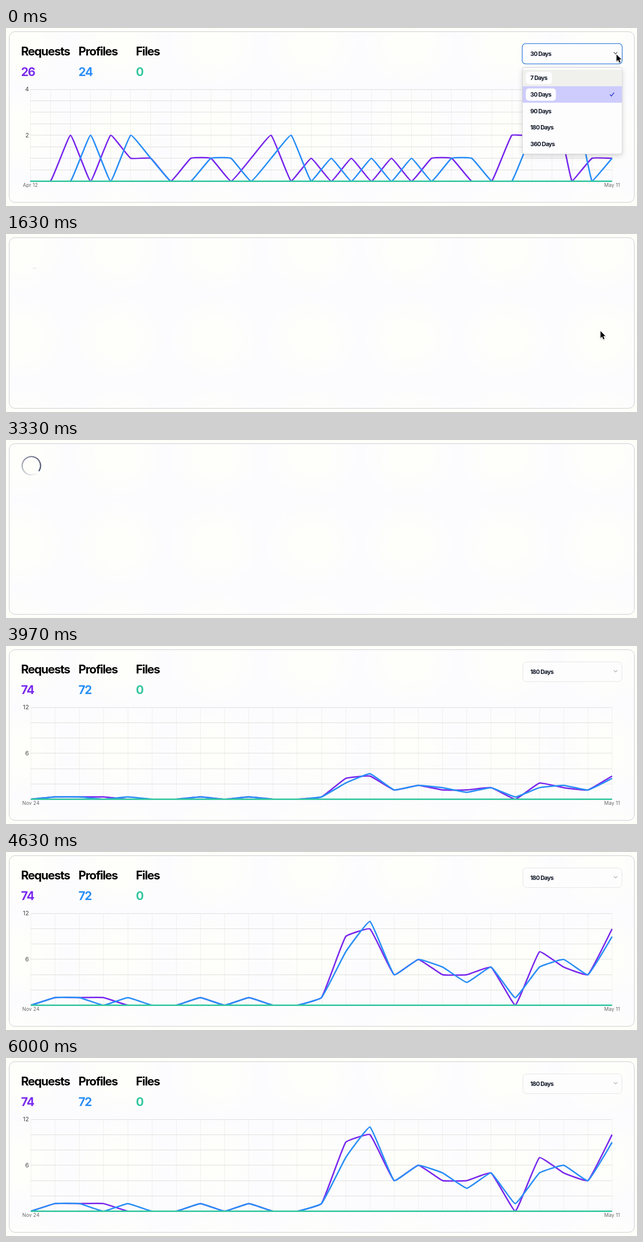
An HTML page with a canvas that plays this animation: 1280 px wide and 363 px high, repeating every 6.03 s.

```html
<!DOCTYPE html>
<html lang="en">
<head>
<meta charset="utf-8">
<style>
  html, body { margin: 0; width: 100%; height: 100%; overflow: hidden; background: #fefef9; }
  #panel {
    position: absolute; left: 6px; top: 7px; width: 1267px; height: 347px;
    border: 1px solid #c8c8d0; border-radius: 12px;
    background: radial-gradient(closest-side, #fefefa, #fefefb 35%, #fcfcfe) -77px -66px / 197px 181px #fcfcfe;
  }
  canvas { position: absolute; left: 0; top: 0; display: block; }
</style>
</head>
<body>
<div id="panel"></div>
<canvas id="stage" width="1280" height="363"></canvas>
<script>
const ctx = document.getElementById('stage').getContext('2d');
const LOOP = 6030, LOAD_AT = 1520, CHART_AT = 3885, CURSOR_GONE = 2850;
const PURPLE = '#7a2aec', BLUE = '#2b8ff6', TEAL = '#35c7a0';
const TOP = 125, BASE = 312.5, RIGHT = 1229.5;
const OPTIONS = ['7 Days', '30 Days', '90 Days', '180 Days', '360 Days'];

const month = {
  label: '30 Days', totals: [26, 24, 0], left: 49.5, max: 4, rows: 8, from: 'Apr 12',
  requests: [0,0,2,0,2,1,1,0,1,1,0,1,2,0,1,0,1,0,1,0,1,1,0,0,2,2,4,0,1,1],
  profiles: [0,0,0,2,0,2,1,0,0,1,1,0,1,2,0,1,0,1,0,1,0,1,1,0,0,2,2,4,0,1]
};
const halfYear = {
  label: '180 Days', totals: [74, 72, 0], left: 50.5, max: 12, rows: 6, from: 'Nov 24',
  requests: [0,1,1,1,0,0,0,1,0,1,0,0,1,9,10,4,6,4,4,5,0,7,5,4,10],
  profiles: [0,1,1,0,1,0,0,1,0,1,0,0,1,7,11,4,6,5,3,5,1,5,6,4,9]
};

// Cursor tip: time, x, y
const cursorPath = [[0,1238.5,54], [200,1238,56], [550,1223,138], [870,1213.5,175], [1150,1207,202], [1500,1206,198]];

function text(str, x, y, size, weight, color, spacing = 0, align = 'left') {
  ctx.font = `${weight} ${size}px Inter, sans-serif`;
  ctx.letterSpacing = spacing + 'px';
  ctx.textAlign = align;
  ctx.fillStyle = color;
  ctx.fillText(str, x, y);
}

const label = (str, x, y) => text(str, x, y, 12, 700, '#111827', -0.8);
const date = (str, x) => text(str, x, 324, 10, 400, '#666', 0.15, 'center');
const tickLabel = (value, y) => text(value, 46.5, y, 12, 400, '#444', 0, 'right');

function line(points, color, width) {
  ctx.beginPath();
  points.forEach(([x, y]) => ctx.lineTo(x, y));
  ctx.strokeStyle = color;
  ctx.lineWidth = width;
  ctx.stroke();
}

function box(x, y, w, h, r, fill, stroke, width = 1) {
  ctx.beginPath();
  ctx.roundRect(x, y, w, h, r);
  ctx.fillStyle = fill;
  ctx.fill();
  if (!stroke) return;
  ctx.shadowColor = 'transparent';
  ctx.strokeStyle = stroke;
  ctx.lineWidth = width;
  ctx.stroke();
}

// Cardinal spline whose handles are weighted by neighbour distance
function curve(pts, color) {
  const clampY = y => Math.min(BASE, Math.max(TOP, y));
  const handles = pts.map((p, i) => {
    const a = pts[i - 1] || p, b = pts[i + 1] || p;
    const before = Math.hypot(p[0] - a[0], p[1] - a[1]);
    const after = Math.hypot(b[0] - p[0], b[1] - p[1]);
    const k = 0.1 / (before + after), dx = b[0] - a[0], dy = b[1] - a[1];
    return [p[0] - k * before * dx, clampY(p[1] - k * before * dy),
            p[0] + k * after * dx, clampY(p[1] + k * after * dy)];
  });
  ctx.beginPath();
  ctx.moveTo(...pts[0]);
  for (let i = 1; i < pts.length; i++)
    ctx.bezierCurveTo(handles[i - 1][2], handles[i - 1][3], handles[i][0], handles[i][1], ...pts[i]);
  ctx.strokeStyle = color;
  ctx.lineWidth = 3;
  ctx.stroke();
}

function drawChart(data, grow) {
  const { left, max, rows, requests, profiles } = data;
  const step = (RIGHT - left) / (requests.length - 1);
  requests.forEach((_, i) => {
    const x = Math.floor(left + i * step) + 0.5;
    line([[x, TOP], [x, BASE]], '#eeeeea', 1);
  });
  for (let i = 0; i <= rows; i++) {
    const y = Math.floor(TOP + i * (BASE - TOP) / rows) + 0.5;
    line([[left, y], [RIGHT, y]], '#dcdcda', 1);
  }
  tickLabel(max, 129);
  tickLabel(max / 2, 222.5);
  date(data.from, left);
  date('May 11', RIGHT);

  ctx.save();
  ctx.beginPath();
  ctx.rect(left - 1, TOP - 2, RIGHT - left + 2, BASE - TOP + 4);
  ctx.clip();
  const plot = values => values.map((v, i) => [left + i * step, BASE - v / max * (BASE - TOP) * grow]);
  curve(plot(requests), PURPLE);
  curve(plot(profiles), BLUE);
  line([[left, BASE], [RIGHT, BASE]], TEAL, 3);
  ctx.restore();
}

function drawHeader(data) {
  [['Requests', 30.5, PURPLE], ['Profiles', 147, BLUE], ['Files', 263.5, TEAL]].forEach(([name, x, color], i) => {
    text(name, x, 56, 24, 700, '#050505', -1.35);
    text(data.totals[i], x, 97.5, 24, 700, color, -1.35);
  });
}

function drawSelect(name, open) {
  if (open) box(1047.2, 31.7, 202.8, 41.5, 7, '#fdfdfe', '#4a8be0', 1.6);
  else box(1048.5, 32.5, 201, 40, 7, '#fdfdfd', '#e3e3e3');
  label(name, 1063.5, 57);
  line([[1233, 49.5], [1236.5, 53], [1240, 49.5]], open ? '#444' : '#aaa', 1.2);
}

function drawMenu(active) {
  ctx.save();
  ctx.shadowColor = 'rgba(0,0,0,.16)';
  ctx.shadowBlur = 12;
  ctx.shadowOffsetY = 4;
  box(1047.5, 80.5, 202.5, 176.5, 4, '#fdfdfe', '#cfcfd2');
  ctx.restore();
  OPTIONS.forEach((name, i) => {
    const y = 85 + i * 33.7, selected = i === 1;
    if (selected || i === active) {
      ctx.fillStyle = selected ? '#cdccfc' : '#f0f0ed';
      ctx.fillRect(1048, y, 201.5, 33.7);
      label(name, 1063.5, y + 21.2);
      box(1054.5, y + 4.5, ctx.measureText(name).width + 18.5, 25, 6, '#fdfdfe');
    }
    label(name, 1063.5, y + 21.2);
  });
  line([[1225, 135.5], [1228, 138.8], [1233.5, 131.8]], '#2f35d0', 1.5);
}

function drawSpinner(t) {
  const turn = 2 * Math.PI, start = Math.PI / 3, progress = t / 1940;
  const tail = Math.max(0, progress - 1), head = Math.min(1, progress);
  const fade = ctx.createConicGradient(start, 51.5, 52.5);
  fade.addColorStop(0, 'rgba(62,68,98,.04)');
  fade.addColorStop(0.42, 'rgba(62,68,98,.52)');
  fade.addColorStop(1, 'rgba(62,68,98,1)');
  ctx.beginPath();
  ctx.arc(51.5, 52.5, 18.7, start + tail * turn, start + head * turn);
  ctx.strokeStyle = fade;
  ctx.lineWidth = 2.6;
  ctx.stroke();
}

function cursorAt(t) {
  const next = cursorPath.findIndex(p => p[0] > t);
  if (next < 0) return cursorPath.at(-1).slice(1);
  const [t0, x0, y0] = cursorPath[next - 1], [t1, x1, y1] = cursorPath[next];
  const k = (t - t0) / (t1 - t0);
  return [x0 + (x1 - x0) * k, y0 + (y1 - y0) * k];
}

function drawCursor(x, y) {
  ctx.save();
  ctx.translate(x, y);
  ctx.beginPath();
  [[0,0], [0,14], [3.2,11], [5.6,16.5], [8,15.4], [5.6,10.2], [9.8,10]].forEach(p => ctx.lineTo(...p));
  ctx.closePath();
  ctx.lineJoin = 'round';
  ctx.lineWidth = 2;
  ctx.strokeStyle = '#fff';
  ctx.shadowColor = 'rgba(0,0,0,.3)';
  ctx.shadowBlur = 2;
  ctx.shadowOffsetY = 1;
  ctx.stroke();
  ctx.shadowColor = 'transparent';
  ctx.fillStyle = '#000';
  ctx.fill();
  ctx.restore();
}

function render(t) {
  ctx.clearRect(0, 0, 1280, 363);
  const [x, y] = cursorAt(t);
  if (t >= LOAD_AT && t < CHART_AT) {
    drawSpinner(t - LOAD_AT);
  } else {
    const open = t < LOAD_AT, data = open ? month : halfYear;
    const rest = 1 - Math.min(1, (t - CHART_AT) / 1000);
    drawChart(data, open ? 1 : 1 - rest ** 4);
    drawHeader(data);
    drawSelect(data.label, open);
    if (open) drawMenu(Math.max(0, Math.floor((y - 85) / 33.7)));
  }
  if (t < CURSOR_GONE) drawCursor(x, y);
}

const began = performance.now();
function tick() {
  render((performance.now() - began) % LOOP);
  requestAnimationFrame(tick);
}
tick();
</script>
</body>
</html>
```
